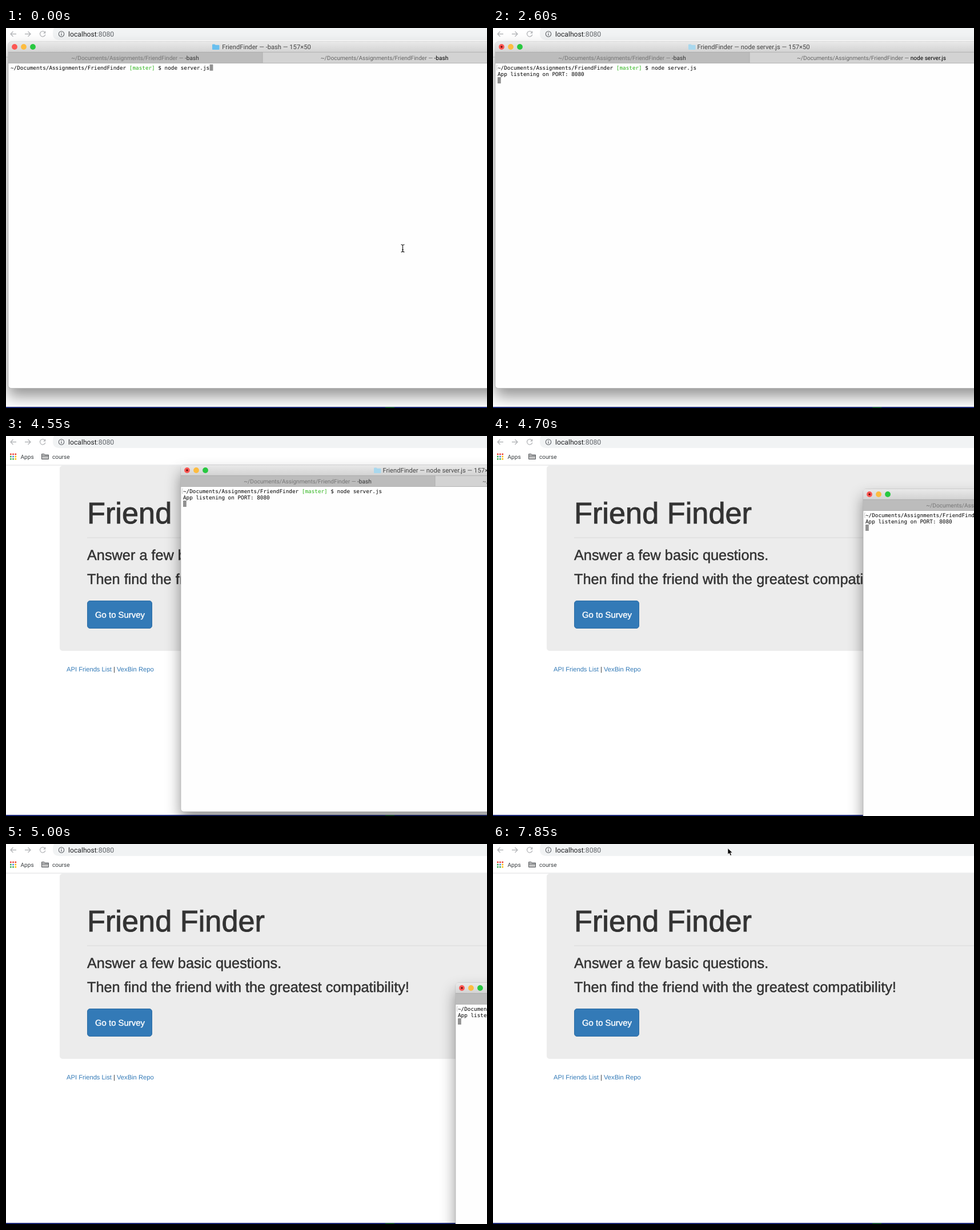
Recreate the animation shown at these times as an HTML page. Size 842 by 665 pixels, loop 8 s.

```html
<!DOCTYPE html>
<html lang="en">
<head>
<meta charset="utf-8">
<title>Friend Finder</title>
<style>
html, body { margin: 0; width: 100%; height: 100%; overflow: hidden; background: #fff; }
svg { display: block; text-rendering: geometricPrecision; }
text { white-space: pre; }
.ui { font-family: Roboto, sans-serif; }
.page { font-family: "Liberation Sans", Arial, sans-serif; fill: #333; }
.mid { stroke: #333; }
.mono { font: 9.34px "DejaVu Sans Mono", monospace; }
.tab { font-size: 10.1px; text-anchor: middle; }
.mark { font-size: 10.1px; fill: #3c4043; }
.icon { fill: none; stroke: #b4b6b9; stroke-width: 1.3; }
</style>
</head>
<body>
<svg width="842" height="665" viewBox="0 0 842 665">
  <defs>
    <filter id="shadow" filterUnits="userSpaceOnUse" x="-60" y="-40" width="1020" height="760" color-interpolation-filters="sRGB">
      <feDropShadow dx="0" dy="14" stdDeviation="13" flood-color="#000" flood-opacity=".42"/>
    </filter>
    <linearGradient id="bar" x2="0" y2="1">
      <stop stop-color="#e9e9e9"/><stop offset="1" stop-color="#d3d3d3"/>
    </linearGradient>
  </defs>

  <!-- browser -->
  <rect width="842" height="665" fill="#fff"/>
  <path d="M842 0H84Q82 4 82 10Q82 21 94 21H842Z" fill="#f1f3f4"/>
  <path class="icon" d="M18 10.5H8M12.5 6L8 10.5L12.5 15M33 10.5H43M38.5 6L43 10.5L38.5 15"/>
  <path class="icon" d="M68.3 8A4.7 4.7 0 1 0 68.8 11.5"/>
  <path d="M69.3 5V9.4H65Z" fill="#b4b6b9"/>
  <circle cx="97" cy="10.5" r="4.7" fill="none" stroke="#5f6368" stroke-width="1.1"/>
  <path d="M97 7.6V8.8M97 9.8V13.3" stroke="#5f6368" stroke-width="1.2"/>
  <text class="ui" x="109" y="14.5" font-size="12.2" fill="#202124">localhost<tspan fill="#5f6368">:8080</tspan></text>
  <g id="dots"></g>
  <text class="ui mark" x="25.5" y="39.5">Apps</text>
  <path d="M62.5 40.5V31.5H67L68.2 33H74.5V40.5ZM62.5 35H74.5" fill="#c4c4c4" stroke="#55585c"/>
  <text class="ui mark" x="81" y="39.5">course</text>
  <path d="M0 51H842" stroke="#dcdddf"/>

  <!-- page -->
  <g class="page">
    <rect x="94" y="52" width="780" height="324" rx="5" fill="#ececec"/>
    <text class="mid" x="142" y="153" font-size="52.3" stroke-width=".9">Friend Finder</text>
    <path d="M142 178H842" stroke="#d9d9d9" stroke-width="1.2"/>
    <g class="mid" font-size="25.3" stroke-width=".5">
      <text x="142" y="216.5">Answer a few basic questions.</text>
      <text x="142" y="259">Then find the friend with the greatest compatibility!</text>
    </g>
    <rect x="142.5" y="288.5" width="113" height="48" rx="4.5" fill="#337ab7" stroke="#2e6da4"/>
    <text x="156" y="318" font-size="14.9" fill="#fff" stroke="#fff" stroke-width=".4">Go to Survey</text>
    <g font-size="11.2" fill="#337ab7">
      <text x="106" y="411.7">API Friends List</text>
      <text x="188" y="411.7" fill="#333">|</text>
      <text x="194" y="411.7">VexBin Repo</text>
    </g>
  </g>
  <path d="M0 664H842" stroke="#1d2a78" stroke-width="2"/>
  <path d="M664 664.3H680" stroke="#1c6b2a" stroke-width="1.4"/>

  <!-- terminal window -->
  <g id="win">
    <rect x="4" y="24" width="889" height="606.5" rx="5" fill="#fefefe" stroke="#a5a5a5" stroke-width=".6" filter="url(#shadow)"/>
    <path d="M4 42V29Q4 24 9 24H888Q893 24 893 29V42Z" fill="url(#bar)"/>
    <rect x="4" y="42" width="445" height="19.5" fill="#bcbcbc"/>
    <rect x="449" y="42" width="444" height="19.5" fill="#d3d3d3"/>
    <path d="M4 42.3H893M4 61.5H893M449 42V61" stroke="#a9a9a9" stroke-width=".8"/>
    <circle cx="15" cy="33" r="4.9" fill="#fc5753"/>
    <circle cx="31" cy="33" r="4.9" fill="#fdbc40"/>
    <circle cx="47" cy="33" r="4.9" fill="#28c840"/>
    <circle id="busy" cx="15" cy="33" r="1.7" fill="#6a0a08"/>
    <g id="folder">
      <path d="M0 29.5Q0 28.5 1 28.5H4.5L5.7 29.8H11.5Q12.5 29.8 12.5 31V37Q12.5 38 11.5 38H1Q0 38 0 37Z"/>
    </g>
    <g class="ui">
      <text id="title" x="456" y="37" font-size="11.2" text-anchor="middle" fill="#444"></text>
      <text class="tab" x="226" y="56" fill="#777">~/Documents/Assignments/FriendFinder — <tspan fill="#333">-bash</tspan></text>
      <text class="tab" x="662.5" y="56" fill="#666">~/Documents/Assignments/FriendFinder — <tspan id="job" fill="#000"></tspan></text>
    </g>
    <path id="bracket" d="M8 65.5H6.5V73.5H8" fill="none" stroke="#c4c4c4" stroke-width=".8"/>
    <g class="mono">
      <text x="8" y="72.6">~/Documents/Assignments/FriendFinder <tspan fill="#2fb41d">[master]</tspan> $ node server.js</text>
      <text id="reply" x="8" y="83.8">App listening on PORT: 8080</text>
    </g>
    <rect id="caret" width="5.8" height="11" fill="#919191"/>
  </g>

  <!-- pointers -->
  <path id="beam" d="M-3-6.5Q0-6.5 0-4.5Q0-6.5 3-6.5M0-5V5M-3 6.5Q0 6.5 0 4.5Q0 6.5 3 6.5M-1.5 2.5H1.5" fill="none" stroke="#111" stroke-width="1.1"/>
  <path id="arrow" d="M411 7.5V18.3L413.6 16L415.4 20.3L417.5 19.4L415.7 15.3H419.2Z" fill="#000" stroke="#fff" stroke-width=".7"/>
</svg>
<script>
const $ = id => document.getElementById(id);
const show = (id, on) => $(id).setAttribute("visibility", on ? "visible" : "hidden");
const move = (id, x, y) => $(id).setAttribute("transform", `translate(${x} ${y})`);

const [red, green, blue, yellow] = ["#ea4335", "#34a853", "#4285f4", "#fbbc05"];
$("dots").innerHTML = [red, red, red, green, blue, yellow, green, green, yellow].map((c, i) =>
  `<rect x="${7 + i % 3 * 4.2}" y="${30.5 + Math.floor(i / 3) * 4.2}" width="2.7" height="2.7" rx=".7" fill="${c}"/>`).join("");

// the window is dragged away in 150 ms steps
const DRAG = 4400, STEP = 150;
const drag = [[102, 6.5], [302, 27], [644, 69], [751, 143], [783, 219], [851, 269]];

function draw(t) {
  const entered = t >= 500, running = t >= 650;
  const job = running ? "node server.js" : "-bash";
  $("title").textContent = `FriendFinder — ${job} — 157×50`;
  $("job").textContent = job;
  move("folder", running ? 342 : 361, 0);
  $("folder").setAttribute("fill", running ? "#a9d8ee" : "#69bfee");
  show("busy", running);
  show("bracket", entered);
  show("reply", running);
  if (running) move("caret", 8, 86);
  else if (entered) move("caret", 8, 75);
  else move("caret", 356.6, 63.7);

  const step = Math.floor((t - DRAG) / STEP);
  $("win").style.display = step < drag.length ? "" : "none";
  move("win", ...(drag[step] || [0, 0]));

  show("beam", t < 2600);
  if (t < 2450) move("beam", 694.5, 385.5);
  else move("beam", 724, 367.5);
  show("arrow", t >= 7850);
}

const start = performance.now();
function tick() {
  draw((performance.now() - start) % 8000);
  requestAnimationFrame(tick);
}
tick();
</script>
</body>
</html>
```
